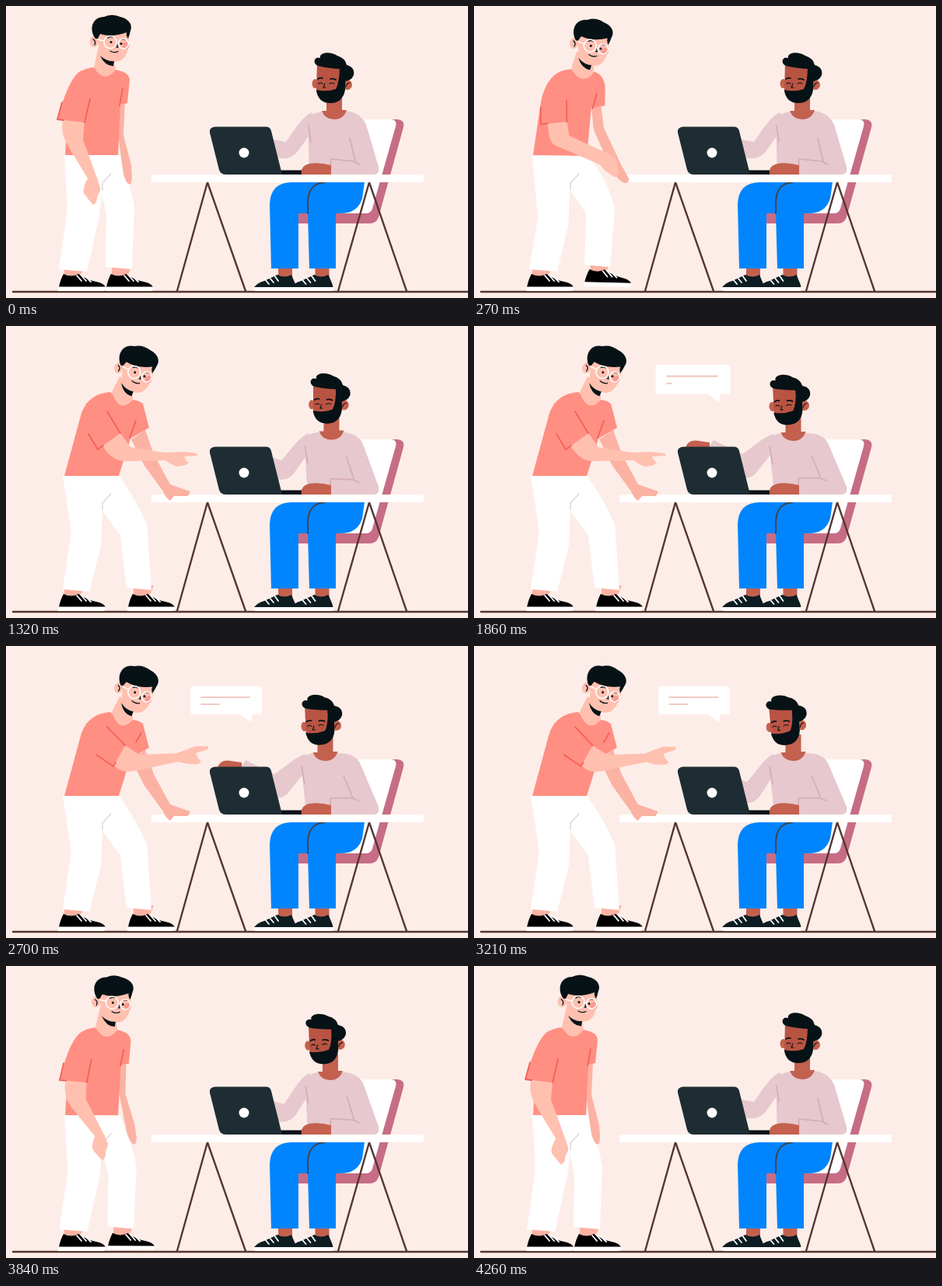
An HTML page for the animation above (4500 ms loop, 594 px wide and 376 px high).

```html
<!DOCTYPE html>
<html lang="en">
<head>
<meta charset="utf-8">
<title>Two colleagues at a desk</title>
<style>
  html, body { margin: 0; width: 100%; height: 100%; overflow: hidden; background: #fdede8; }
  svg { display: block; width: 594px; height: 376px; }
  .line { fill: none; stroke-linecap: round; stroke-linejoin: round; }
  .skin { fill: #ffc0b0; }
  .far { fill: #fbb2a3; }
  .coral { fill: #ff8f82; }
  .white { fill: #fff; }
  .ink { fill: #071216; }
  .brown { fill: #c4604e; }
  .mauve { fill: #e6c8ce; }
  .fold { stroke: #f4605a; stroke-width: 1.8; }
  .crease { stroke: #d5aab6; stroke-width: 1.6; }
  .wood { stroke: #55362e; stroke-width: 2.4; }
  .lace { stroke: #fff; stroke-width: 1.8; }
  .pen { stroke: #071216; stroke-width: 1.8; }
  .text { stroke: #f1cbc4; stroke-width: 2; }
</style>
</head>
<body>
<svg viewBox="0 0 594 376">
  <defs>
    <g id="shoe">
      <path class="far" d="M75 334H101L95 349H75Z"/>
      <path fill="#000" d="M68 362Q70 352 74 345Q84 350 93 345Q105 353 116 355Q126 357 128 362Z"/>
      <path class="white" d="M67 361.500H128V364Q128 367 124 367H67Z"/>
      <path class="line lace" d="M91 347L97 354M96 346L103 354M102 348L109 355"/>
    </g>
    <g id="loafer">
      <path class="brown" d="M350 336H368V349H350Z"/>
      <path fill="#0d1d22" d="M319 362Q324 356 332 354L349 346Q358 351 367 346L372 358L373 362Z"/>
      <path class="white" d="M318 362H373V367H322Q318 367 318 362Z"/>
      <path class="line lace" d="M333 352L338 358M339 350L344 356M345 347L350 354"/>
    </g>
  </defs>

  <path class="line wood" d="M9 368H600"/>

  <!-- chair and seated man -->
  <path fill="#c66d85" d="M490 146H503Q513 147 511 156L479 272Q476 280 468 280H376V260H460Z"/>
  <path class="white" d="M440 146H496Q503 147 501 155L471 261Q469 267 462 267H376Z"/>
  <use href="#loafer"/><use href="#loafer" x="47.500"/>
  <path fill="#0085ff" d="M341 338L339 255Q340 227 368 227H461L458 248Q452 267 430 267H424V338H390L388 267H376V338Z"/>
  <path class="line" stroke="#43424a" stroke-width="2" d="M410 227C394 228 388 238 388 255V267"/>
  <path id="sitTorso" class="mauve"/>
  <path id="sitArm" class="mauve"/>
  <path id="sitFolds" class="line crease"/>
  <path id="neck2" class="brown" d="M406 135Q410 146 422 146Q434 146 438 134L432 134V112H412V135Z"/>
  <g id="head2">
    <ellipse class="brown" cx="397.500" cy="100" rx="4" ry="6"/>
    <path fill="#b95443" d="M400 74L399 110Q402 122 416 122L435 112V74Z"/>
    <ellipse class="brown" cx="439" cy="101.500" rx="6" ry="6.500"/>
    <path class="ink" d="M399 108Q412 111 424 107Q429 98 429 78H437L436 108Q433 125 417 125Q401 125 399 108Z"/>
    <path class="ink" d="M401 77C393 73 397 64 404 67C402 59 418 58 426 64Q436 67 438 76Q449 79 447 89Q444 97 433 97Q428 88 429 81Q413 80 401 77Z"/>
    <path class="line pen" d="M401 94Q404 92 407 93M417 94Q420 93 424 95"/>
    <path class="line" stroke="#071216" stroke-width="1.100" d="M402 100Q404 98 407 100M416 100Q419 98 422 100M410 100L408 105H411M437 104Q438 99 442 99"/>
  </g>
  <path id="lidHand" class="brown" d="M272 157Q274 147 286 147.500L303 150V160H274Z"/>
  <path fill="#071216" d="M350 211.500H382V217H350Z"/>
  <path class="brown" d="M380 217Q378 206 390 203Q402 201 418 205V217Z"/>
  <path fill="#1e2d33" d="M269 155.500H335Q340 156 341 161L355 217H283Q276 217 274 211L262 163Q261 156 269 155.500Z"/>
  <circle class="white" cx="306" cy="189" r="6.500"/>

  <!-- table -->
  <path class="line wood" d="M220 367L259 227L308 367M427 367L467 227L515 367"/>
  <path class="white" d="M187 217H537V227H187Z"/>

  <!-- speech bubble -->
  <g id="bubble">
    <path class="white" d="M241 52H325Q329 52 329 56V84Q329 88 325 88H316V98L301 88H241Q237 88 237 84V56Q237 52 241 52Z"/>
    <path id="words" class="line text"/>
  </g>

  <!-- standing man -->
  <g id="step"><use href="#shoe"/></g>
  <use href="#shoe"/>
  <path id="legR" class="white"/>
  <path id="legL" class="white"/>
  <path class="line" stroke="#ddd9d8" stroke-width="1.500" d="M124 237V228L135 216"/>
  <path id="farArm" class="far"/>
  <path id="torso" class="coral"/>
  <path id="neck" class="skin"/>
  <g id="head">
    <ellipse class="skin" cx="113" cy="46" rx="5.500" ry="7"/>
    <path class="skin" d="M116 30L121 63Q131 74 145 71Q157 68 158 45L157 28Z"/>
    <path class="ink" d="M121 64Q130 72 139 71L138 77.500Q127 77 121 64Z"/>
    <circle cx="154" cy="51" r="4.500" fill="#f99a8d"/>
    <path class="ink" d="M115 42C106 30 111 14 126 14Q136 9 147 14C159 17 163 25 160 32Q159 37 157 42Q154 38 155 34Q136 41 121 36L118 42Z"/>
    <path class="line" stroke="#071216" stroke-width="1.400" d="M131 41Q134 39 137 40M149 43Q151 42 153 43"/>
    <circle class="ink" cx="135" cy="46.500" r="1.500"/><circle class="ink" cx="148" cy="48.500" r="1.500"/>
    <path class="line" stroke="#071216" stroke-width="1.300" d="M143 50L144 53H142M134 58Q139 61 144 58.500M112 43Q116 45 114 50"/>
    <g class="line" stroke="#fff" stroke-width="1.500">
      <circle cx="134" cy="46.500" r="8"/><circle cx="151" cy="48.500" r="6.500"/><path d="M126 45L118 43"/>
    </g>
  </g>
  <path id="nearArm" class="skin"/>
  <path id="sleeve" class="coral"/>
  <path id="folds" class="line fold"/>
</svg>

<script>
const LOOP = 4500, STEP = 30, MID = 0.44;

// Standing man: upright, mid-step, leaning in, and optionally pointing higher.
const stand = {
  legL: ["M75 192 L140 192 L124 236 L120 270 L104 342 L68 339 L79 262Z",
         "M75 193 L140 193 L123 237 L121 283 L107 342 L71 339 L82 273Z",
         "M73 193 L140 193 L124 235 L122 283 L107 342 L73 339 L84 265Z"],
  legR: ["M90 192 L146 192 Q158 222 165 258 L162 339 L128 336 L129 268 L122 235Z",
         "M90 192 L145 192 Q172 222 181 262 L174 336 L141 333 L144 267 L122 235Z",
         "M90 192 L145 192 Q168 225 181 256 L187 340 L155 337 L147 270 L122 235Z"],
  farArm: ["M144 126 L144 165 L149 203 Q151 222 156 228 L159 230 L161 228 L162 222 L161 205 L151 166 L153 124Z",
           "M150 130 L152 158 L172 205 Q180 220 187 226 L193 229 L195 228 L196 223 L187 204 L165 156 L162 128Z",
           "M161 146 L178 180 L202 213 Q205 221 211 225 L216 219 L234 219 L237 213 L211 204 L190 165 L179 134Z"],
  torso: ["M112 79 C94 81 86 92 81 107 L76 192 L144 192 L147 127 L156 125 L159 95 C158 88 154 85 141 82 Q126 90 112 79Z",
          "M124 81 C101 82 90 100 85 125 L76 192 L145 193 L150 130 L167 128 L168 104 C166 90 160 86 154 84 Q138 90 124 81Z",
          "M134 85 C112 87 103 98 97 112 L75 193 L145 193 L160 145 L184 131 L176 100 C172 97 169 96 164 95 Q148 100 134 85Z"],
  neck: ["M119 52 L138 65 L141 82 Q126 101 113 79Z",
         "M131 58 L152 70 L154 84 Q139 104 124 81Z",
         "M146 65 L163 76 L163 95 Q146 114 136 85Z"],
  nearArm: ["M73 147 C70 163 75 172 82 184 L105 222 Q98 235 100 241 L106 249 L112 256 Q118 253 117 246 L121 238 L121 234 L118 224 L115 216 L99 172 L101 149Z",
            "M92 150 C93 165 93 178 102 181 L158 207 Q162 213 167 217 L176 224 L180 223 Q182 215 180 205 L178 202 L176 199 L168 192 L160 188 L119 168 L117 149Z",
            "M124 154 C133 170 145 175 157 174 L205 173 Q214 180 221 181 L231 179 L235 176 Q230 172 229 168 L246 167 L246 164 L228 162 L203 163 L160 156 L147 138Z",
            "M138 152 C143 160 152 163 164 161 L222 149 Q230 152 237 152 L247 152 L251 149 Q246 144 244 138 L260 133 L260 129 L243 129 L220 138 L172 140 L153 128Z"],
  sleeve: ["M97 83 Q81 91 66 146 L101 150 L108 118Z",
           "M104 88 Q85 106 83 152 L117 150 L118 120Z",
           "M103 99 Q100 125 118 159 L147 138 L128 108Z",
           "M103 99 Q108 130 138 155 L153 128 L128 104Z"],
  folds: ["M72 124 L66 146 L74 147 M108 120 L101 150 M150 107 L146 128",
          "M84 130 L83 152 L92 151 M118 122 L117 150 M157 112 L152 131",
          "M106 139 L118 159 L125 154 M130 110 L147 138 M167 122 L159 144",
          "M116 140 L138 155 L141 150 M130 104 L153 128 M174 112 L167 124"],
  head: ["translate(0 0) rotate(0 134 46)", "translate(14 4) rotate(7 134 46)", "translate(31 13) rotate(14 134 46)"],
  step: ["translate(61 0) rotate(0 98 360)", "translate(73 -6) rotate(1.5 98 360)", "translate(89 0) rotate(0 98 360)"]
};

// Seated man: upright and leaning forward; the arm also reaches for the lid.
const sit = {
  sitTorso: ["M407 136 Q422 142 437 135 C452 137 461 145 464 156 L479 207 Q481 217 472 217 L390 217 L388 145 Q394 137 407 136Z",
             "M396 138 Q411 145 426 138 C442 138 452 142 456 153 L479 207 Q481 217 472 217 L386 217 L379 148 Q384 138 396 138Z"],
  sitFolds: ["M417 217 L418 197 L447 200 L455 204 M442 170 L449 200 M389 154 L392 175",
             "M417 217 L417 196 L445 196 L453 199 M434 167 L446 196 M380 155 L384 178"],
  sitArm: ["M394 137 C382 141 372 158 360 175 L344 172 L330 185 L352 196 Q368 198 376 186 L391 165Z",
           "M385 139 C374 145 366 165 354 181 L345 177 L330 190 L350 206 Q362 208 370 196 L386 168Z",
           "M385 139 C372 143 360 155 345 165 L308 147 L302 156 L340 192 Q352 200 362 190 L386 160Z"]
};

const NUM = /-?\d+(\.\d+)?/g;

function mix(a, b, k) {
  const to = b.match(NUM);
  let i = 0;
  return a.replace(NUM, x => (+x + (to[i++] - x) * k).toFixed(2));
}

function ease(u) {
  const s = 1 - (1 - u) ** 1.4;
  return s * s * (3 - 2 * s);
}

// keys: time, value, time, value, ...
function track(t, ...keys) {
  if (t <= keys[0]) return keys[1];
  for (let i = 2; i < keys.length; i += 2) {
    const [t0, v0, t1, v1] = keys.slice(i - 2, i + 2);
    if (t < t1) return v0 + (v1 - v0) * ease((t - t0) / (t1 - t0));
  }
  return keys[keys.length - 1];
}

const put = (id, name, value) => document.getElementById(id).setAttribute(name, value);

function drawStanding(t) {
  const lean = track(t, 30, 0, 660, 1, 3180, 1, 4100, 0);
  const raise = track(t, 500, 0.09, 1000, 0, 1950, 0, 2600, 1);
  for (const id in stand) {
    const [up, mid, low, high = low] = stand[id];
    const pose = lean < MID
      ? mix(up, mid, lean / MID)
      : mix(mid, mix(low, high, raise), (lean - MID) / (1 - MID));
    put(id, pose[0] === "M" ? "d" : "transform", pose);
  }
}

function drawSeated(t) {
  const lean = track(t, 1110, 0, 1860, 1, 3550, 1, 4230, 0);
  const reach = track(t, 1110, 0, 1860, 1, 2950, 1, 3500, 0);
  const nod = track(t, 2950, 0, 3500, 1, 3600, 1, 4230, 0);
  for (const id in sit) {
    const [back, front, lid = front] = sit[id];
    put(id, "d", mix(mix(back, front, lean), lid, reach));
  }
  put("neck2", "transform", `translate(${-11.5 * lean} ${2 * lean})`);
  put("head2", "transform",
    `translate(${-12 * lean - 4 * nod} ${2 * lean}) rotate(${-4 * lean - 4 * nod} 422 130)`);
  put("lidHand", "transform", `translate(${30 * (1 - reach)} ${30 * (1 - reach)})`);
}

function drawBubble(t) {
  const size = track(t, 1380, 0, 1700, 1.08, 2130, 1, 3250, 1, 3680, 0);
  const first = track(t, 1550, 0, 1840, 62);
  const second = track(t, 1780, 0, 2120, 23);
  put("bubble", "transform", `translate(316 98) scale(${size}) translate(-316 -98)`);
  put("words", "d", (first ? `M251 66h${first}` : "") + (second ? `M251 75h${second}` : ""));
}

const start = performance.now();

function frame() {
  const t = Math.floor((performance.now() - start) % LOOP / STEP) * STEP;
  drawStanding(t);
  drawSeated(t);
  drawBubble(t);
  requestAnimationFrame(frame);
}
frame();
</script>
</body>
</html>
```
